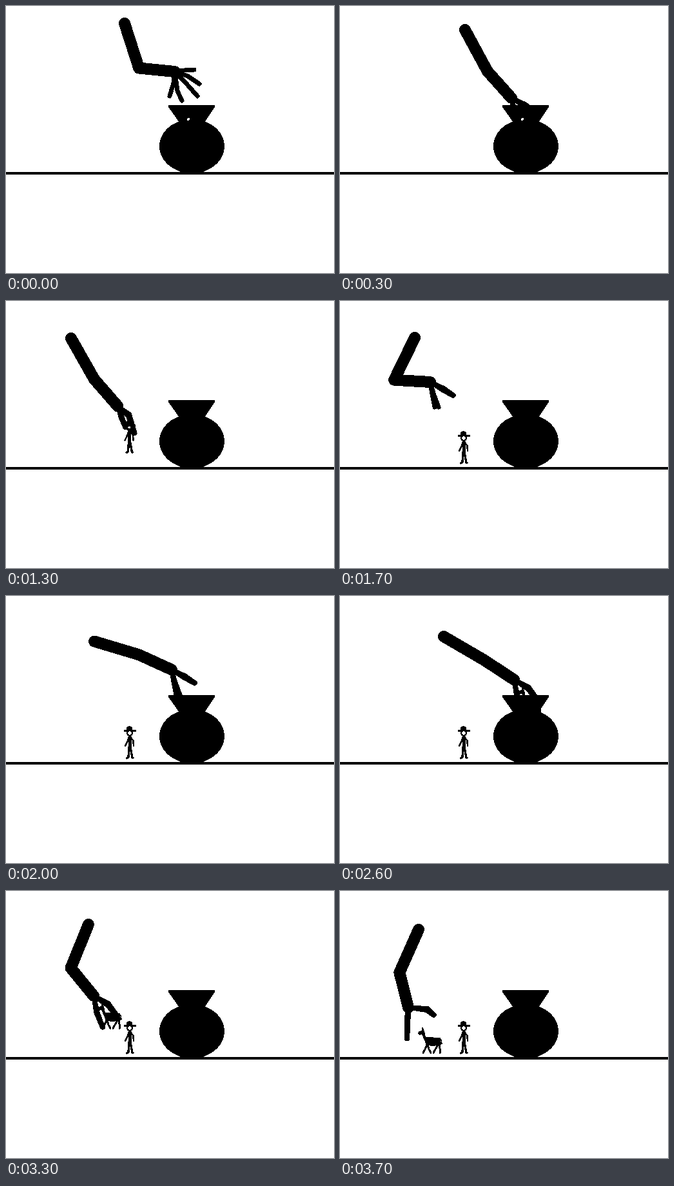
Recreate the animation shown at these times as an HTML page. Size 509x415 px, loop 3800 ms.

```html
<!DOCTYPE html>
<html lang="en">
<head>
<meta charset="utf-8">
<title>Arm and jar</title>
<style>
  html, body { margin: 0; width: 100%; height: 100%; overflow: hidden; background: #fff; }
  svg { display: block; width: 100%; height: 100%; }
  .line { fill: none; stroke: #000; stroke-linecap: round; stroke-linejoin: round; }
</style>
</head>
<body>
<svg viewBox="0 0 509 415" shape-rendering="crispEdges">
  <rect y="258" width="509" height="4"/>

  <g id="jar">
    <path d="M254 156H322L306 180H271Z" stroke="#000" stroke-width="4.5" stroke-linejoin="round"/>
    <ellipse cx="288.5" cy="218" rx="50.5" ry="42"/>
    <path d="M270 255H307V259H270Z"/>
  </g>

  <path id="arm" class="line" stroke-width="18"/>
  <path id="hand" class="line" stroke-width="7"/>

  <!-- origin: centre of the face -->
  <g id="man">
    <path d="M-5 -4V-8Q-4 -11 -1 -10.5Q2 -11.5 4 -8V-4Z"/>
    <path class="line" stroke-width="3" d="M-7.5 -3.5H8.5"/>
    <circle r="5.2"/>
    <path class="line" stroke-width="5" d="M.3 6V21"/>
    <path class="line" stroke-width="2.6" d="M-1 6L-4 14L-7 20M1 6L5.5 12L6 20"/>
    <path class="line" stroke-width="3.4" d="M-1 22L-2 37.5L-4.5 39M1 22L2.5 30L4 38.5H5"/>
    <circle id="face" r="2" fill="#fff"/>
  </g>

  <!-- origin: wrist of the hand that holds it -->
  <g id="donkey">
    <path d="M6 21L7 17L12 16L12 11L14 11L16 17L18 26L41 27L42 38L30 40L19 39L16 31L12 22L8 23Z"/>
    <path class="line" stroke-width="3" d="M20 38L17 45L14 50.5M21 38L23 45L26 50.5M37 38L33 45L30 50.5M39 37L40 44V50.5"/>
    <path class="line" stroke-width="1.5" d="M40 28L42 31L43 36"/>
  </g>
</svg>

<script>
const LOOP = 3800, STEP = 100;
const UPPER = 73, FORE = 56;

// A finger is [knuckle x, y, tip x, y] measured from the wrist.
const pair = (up, low, flare = 1) => [-1, 0, 1, -0.6, 0.6].map((k, i) => {
  const [mx, my, tx, ty] = i < 3 ? up : low;
  return i < 3 ? [mx + k, my - 1.5 * k, tx + k / 2, ty - k / 2]
               : [mx + 2 * k, my, tx + flare * k, ty];
});

const HANDS = {
  spread: [[15, -2, 30, -3], [20, 7, 38, 19], [20, 21, 35, 38], [4, 30, 11, 45], [-2, 18, -8, 38]],
  reach: pair([20, 11, 36, 21], [4, 18, 10, 39], 5),
  pinch: pair([17, 14, 26, 42], [6, 18, 12, 33]),
  grip: pair([22, 13, 36, 31], [5, 26, 14, 49]),
  release: pair([29, 3, 40, 12], [-1, 14, -2, 49])
};

// [step, shoulder x, y, wrist x, y, elbow bend, hand]
const POSES = [
  [0, 184, 27, 262, 102, 1, 'spread'],
  [3, 194, 37, 266, 143, 1, 'reach'],
  [5, 194, 37, 265, 143, 1, 'pinch'],
  [8, 157, 23, 258, 101, 0, 'pinch'],
  [9, 150, 10, 257, 78, 0, 'pinch'],
  [10, 122, 18, 232, 84, 0.5, 'pinch'],
  [11, 97, 44, 200, 113, 1, 'pinch'],
  [13, 101, 58, 173.5, 163.5, 0.8, 'pinch'],
  [14, 104, 73, 174, 180, 1, 'pinch'],
  [15, 104, 66, 168, 172, 1, 'release'],
  [17, 116, 57, 140, 126, 1, 'reach'],
  [20, 137, 70.5, 257, 114.5, -0.5, 'reach'],
  [22, 156, 82, 268, 140, -0.3, 'reach'],
  [24, 156, 82, 268, 140, -0.3, 'reach'],
  [26, 161, 63, 270, 130, -0.2, 'grip'],
  [27, 155, 52, 270, 108, 0, 'grip'],
  [28, 146, 40, 248, 90, 1, 'grip'],
  [30, 125, 31, 193, 102, 1, 'grip'],
  [33, 128, 52, 136, 163, 1, 'grip'],
  [35, 128, 77, 115, 201, 1, 'grip'],
  [37, 122, 60, 106, 181, 1, 'release']
];

const el = id => document.getElementById(id);
const mix = (a, b, k) => a + (b - a) * k;
const place = (id, x, y) => el(id).setAttribute('transform', `translate(${x} ${y})`);

function poseAt(step) {
  const i = Math.max(1, POSES.findIndex(p => p[0] >= step));
  const a = POSES[i - 1], b = POSES[i];
  const k = (step - a[0]) / (b[0] - a[0]);
  const [sx, sy, wx, wy, bend] = [1, 2, 3, 4, 5].map(n => mix(a[n], b[n], k));
  const fingers = HANDS[a[6]].map((f, n) => f.map((v, m) => mix(v, HANDS[b[6]][n][m], k)));
  return { sx, sy, wx, wy, bend, fingers };
}

function elbow({ sx, sy, wx, wy, bend }) {
  const dx = wx - sx, dy = wy - sy, d = Math.hypot(dx, dy);
  const along = (d * d + UPPER * UPPER - FORE * FORE) / (2 * d);
  const side = bend * Math.sqrt(Math.max(0, UPPER * UPPER - along * along));
  return [sx + (dx * along - dy * side) / d, sy + (dy * along + dx * side) / d];
}

function draw(step) {
  const p = poseAt(step);
  const { sx, sy, wx, wy } = p;
  el('arm').setAttribute('d', `M${sx} ${sy}L${elbow(p)}L${wx} ${wy}`);
  el('hand').setAttribute('d', p.fingers.map(([mx, my, tx, ty]) =>
    `M${wx} ${wy}L${wx + mx} ${wy + my}L${wx + tx} ${wy + ty}`).join(''));

  const held = step > 5 && step < 14;
  if (held) place('man', wx + 18, wy + 33);
  else if (step <= 5) place('man', 283, 176);
  else place('man', 192, 213);
  el('face').setAttribute('r', step >= 14 ? 2.7 : 2);

  el('donkey').style.display = step < 26 ? 'none' : '';
  if (step < 35) place('donkey', wx, wy);
  else place('donkey', 115, 201);
}

const start = performance.now();
function tick() {
  const t = (performance.now() - start) % LOOP;
  draw(Math.floor(t / STEP));
  requestAnimationFrame(tick);
}
tick();
</script>
</body>
</html>
```
